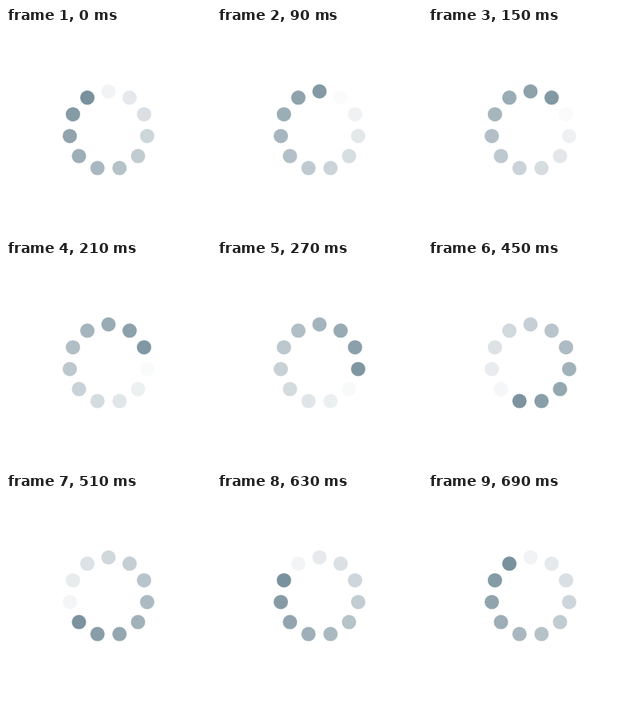
An HTML page that plays this animation: 257 by 257 pixels, repeating every 0.72 s.

```html
<!DOCTYPE html>
<html lang="en">
<head>
<meta charset="utf-8">
<title>Loading spinner</title>
<style>
  html, body { margin: 0; width: 100%; height: 100%; overflow: hidden; background: #fff; }
  svg { display: block; width: 100%; height: 100%; }
</style>
</head>
<body>
<svg id="stage" viewBox="0 0 257 257"></svg>
<script>
const LOOP = 720, STEP = 60, SHIFT = 30;
const COUNT = 11, CENTER = 128.5, RING = 49, RADIUS = 9;
const DARK = [120, 144, 156], LIGHT = [252, 252, 252];
const stage = document.getElementById('stage');

const dots = Array.from({ length: COUNT }, (_, i) => {
  const angle = i / COUNT * 2 * Math.PI;
  const dot = document.createElementNS('http://www.w3.org/2000/svg', 'circle');
  dot.setAttribute('cx', CENTER + RING * Math.sin(angle));
  dot.setAttribute('cy', CENTER - RING * Math.cos(angle));
  dot.setAttribute('r', RADIUS);
  stage.appendChild(dot);
  return dot;
});

const mix = k => `rgb(${DARK.map((d, c) => Math.round(d + (LIGHT[c] - d) * k))})`;
const wrap = (v, n) => ((v % n) + n) % n;

// One turn takes twelve hard steps, so the head moves 11/12 of a dot each time.
function draw(time) {
  const steps = LOOP / STEP;
  const tick = Math.floor(wrap(time - SHIFT, LOOP) / STEP);
  const head = tick * COUNT / steps;
  dots.forEach((dot, i) => dot.setAttribute('fill', mix(wrap(head - i, COUNT) / COUNT)));
}

function frame() {
  draw(performance.now());
  requestAnimationFrame(frame);
}
draw(0);
requestAnimationFrame(frame);
</script>
</body>
</html>
```
